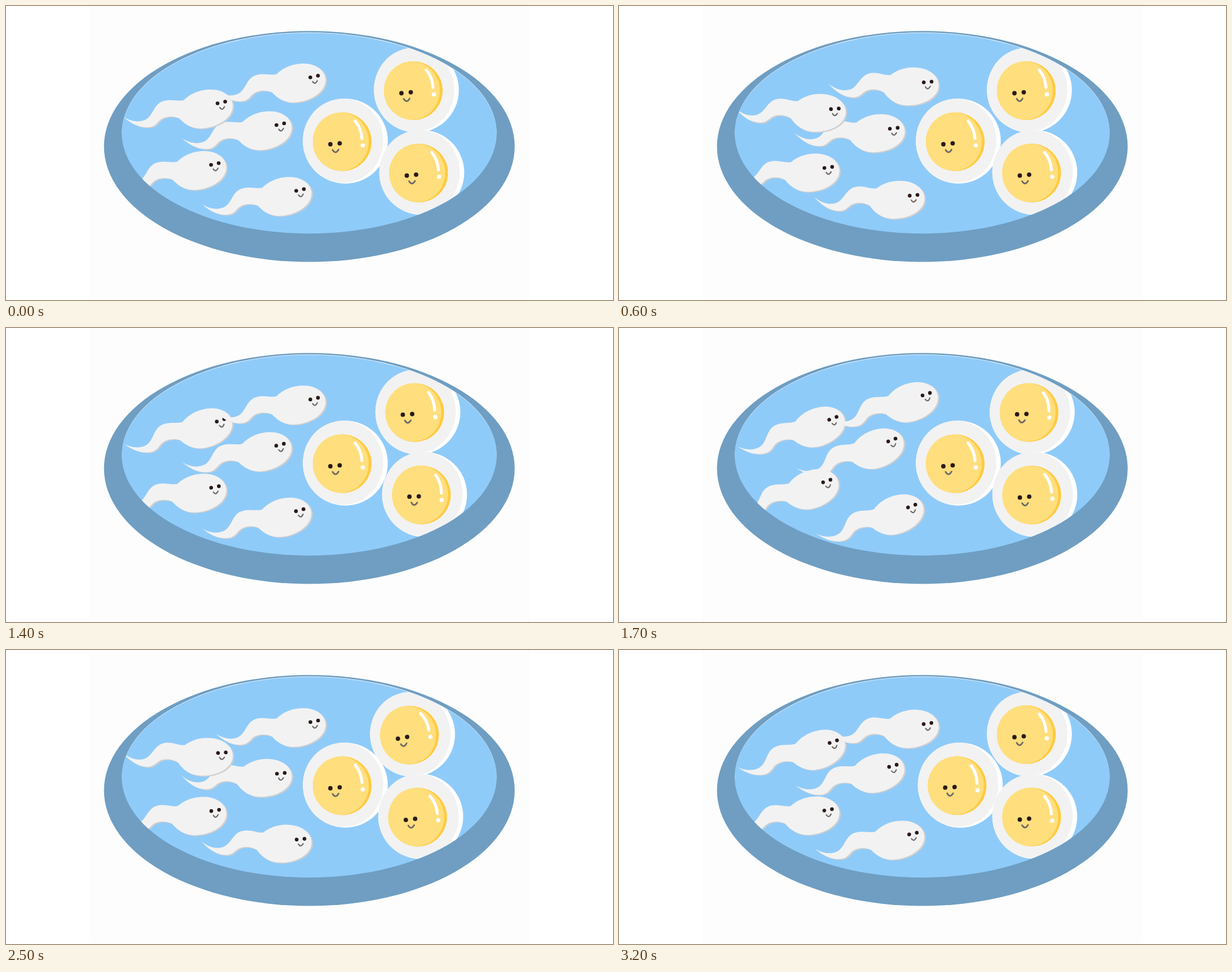
Recreate the animation shown at these times as an HTML page with a canvas. Size 1076x521 px, loop 3.3 s.

```html
<!DOCTYPE html>
<html lang="en">
<head>
<meta charset="utf-8">
<title>Dish</title>
<style>
html, body { margin: 0; width: 100%; height: 100%; overflow: hidden; background: #fff; }
canvas { display: block; }
</style>
</head>
<body>
<canvas id="stage" width="1076" height="521"></canvas>
<script>
const ctx = document.getElementById('stage').getContext('2d');
const LOOP = 3300, STEP = 100;
const SWING = 8.5;
const INK = '#2a1a18', GREY = '#f2f2f2', SMILE = '#6e6967';

// keys: start of motion, then the times of alternating extremes (head down first)
const swimmers = [
  { x: 410.5, y: 221.5, keys: [100, 950, 1730, 2700, 3500] },
  { x: 294.5, y: 292, keys: [160, 1000, 1885, 2870, 3680] },
  { x: 306, y: 183, keys: [0, 650, 1680, 2420, 3420] },
  { x: 470.5, y: 137, keys: [0, 800, 2010, 2920, 3730] },
  { x: 445.5, y: 338, keys: [0, 820, 1800, 2670, 3690] }
];

const eggs = [
  { x: 601.5, y: 239.5, start: 2820 },
  { x: 727.5, y: 149, start: 1090 },
  { x: 737, y: 295, start: 800 }
];

const body = new Path2D(
  'M-98.5 13C-86 21-72 24-60 19C-46 13-45-6-31-13C-16-20-3-13 9-16' +
  'C18-25 34-35 57-35C80-35 96-22 96-6C96 18 64 34 38 34' +
  'C22 34 9 25 1 16C-10 11-26 12-34 20C-42 29-46 32-57 32C-74 32-88 22-98.5 13Z');
const swimmerSmile = new Path2D('M73-3Q77.5 3.5 81.3-4.6');
const eggSmile = new Path2D('M-22.5 15.5Q-17.5 24-12 15');
const shine = new Path2D('M17.5-35.5Q28.5-22.5 29.5-4.5');

const ease = p => (1 - Math.cos(Math.PI * p)) / 2;

function tween(t, times, values) {
  if (t <= times[0]) return values[0];
  for (let i = 1; i < times.length; i++) {
    if (t < times[i]) {
      const p = (t - times[i - 1]) / (times[i] - times[i - 1]);
      return values[i - 1] + (values[i] - values[i - 1]) * ease(p);
    }
  }
  return values[values.length - 1];
}

function oval(x, y, rx, ry, color) {
  ctx.beginPath();
  ctx.ellipse(x, y, rx, ry, 0, 0, Math.PI * 2);
  ctx.fillStyle = color;
  ctx.fill();
}

const dot = (x, y, r, color) => oval(x, y, r, r, color);

function line(path, width, color) {
  ctx.lineWidth = width;
  ctx.strokeStyle = color;
  ctx.stroke(path);
}

function turned(x, y, degrees, draw) {
  ctx.save();
  ctx.translate(x, y);
  ctx.rotate(degrees * Math.PI / 180);
  draw();
  ctx.restore();
}

function drawSwimmer() {
  ctx.save();
  ctx.translate(2.6, 1.4);
  ctx.fillStyle = '#cfcfcf';
  ctx.fill(body);
  ctx.restore();
  ctx.fillStyle = GREY;
  ctx.fill(body);
  dot(69, -10.5, 3.3, INK);
  dot(82.5, -13.5, 3.3, INK);
  line(swimmerSmile, 2.2, SMILE);
}

// the egg rocks on its lowest point
function drawEgg() {
  ctx.translate(0, -75);
  dot(0, 0, 75.3, '#fff');
  oval(-4, -0.7, 71.3, 74.5, GREY);
  dot(-5.5, 1, 52, '#ffcb3f');
  oval(-8, 0.8, 49.5, 51.6, '#ffde7d');
  line(shine, 5.2, '#fff');
  dot(31, 7.5, 3.8, '#fff');
  dot(-26.5, 5.5, 3.9, INK);
  dot(-10, 3.8, 3.9, INK);
  line(eggSmile, 2.8, SMILE);
}

function draw(t) {
  ctx.fillStyle = '#fff';
  ctx.fillRect(0, 0, 1076, 521);
  ctx.fillStyle = '#fdfdfd';
  ctx.fillRect(147, 0, 782, 520);

  ctx.save();
  ctx.lineCap = 'round';
  oval(537.7, 248.9, 364, 204.7, '#6f9ec2');
  oval(537.5, 224.6, 332, 177.8, '#fff');
  oval(537.5, 225.4, 332.2, 177.8, '#8fcbf9');
  ctx.clip();

  for (const s of swimmers) {
    const angle = tween(t, s.keys, [0, SWING, -SWING, SWING, -SWING]);
    turned(s.x, s.y, angle, drawSwimmer);
  }
  for (const e of eggs) {
    const angle = tween(t - e.start, [0, 600, 1300, 1900], [0, 3.8, -5.7, 0]);
    turned(e.x, e.y + 75, angle, drawEgg);
  }
  ctx.restore();
}

const origin = performance.now();
function tick() {
  const t = (performance.now() - origin) % LOOP;
  draw(Math.floor(t / STEP) * STEP);
  requestAnimationFrame(tick);
}
tick();
</script>
</body>
</html>
```
